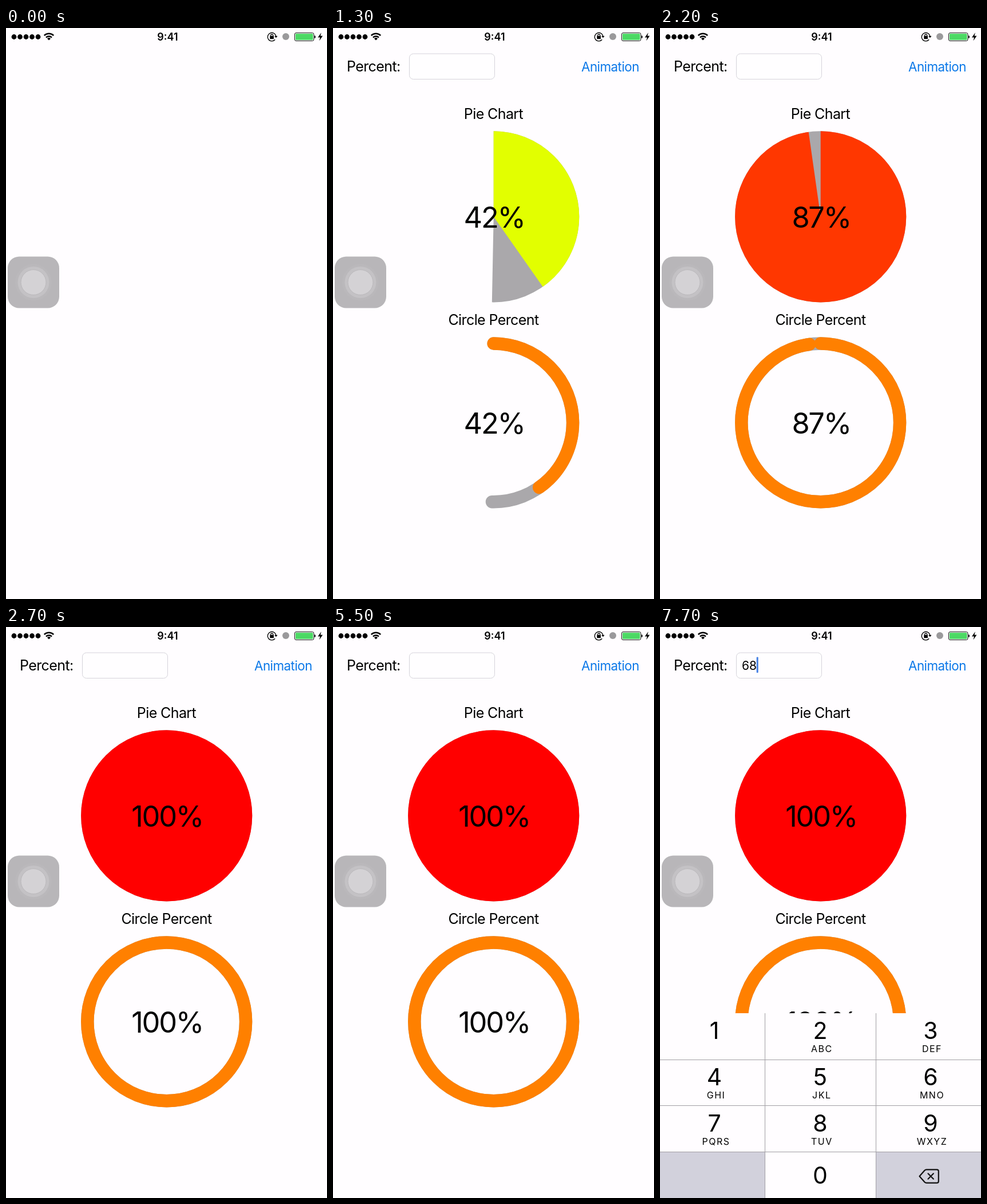
Write an HTML page that moves like this. It is 561x998 px and loops after 8 s.

```html
<!DOCTYPE html>
<html lang="en">
<head>
<meta charset="utf-8">
<title>Percent charts</title>
<style>
  html, body { margin: 0; width: 100%; height: 100%; overflow: hidden; background: #fffdff; }
  svg { display: block; font-family: Inter, Roboto, sans-serif; }
  .label { font-size: 25px; letter-spacing: -.024em; }
  .button { font-size: 22.4px; letter-spacing: -.024em; fill: #0b78e8; }
  .value { font-size: 50.5px; letter-spacing: -.045em; }
  .middle, .value, .digit, .letters { text-anchor: middle; }
  .digit { font-size: 41px; }
  .letters { font-size: 16px; letter-spacing: 1.5px; }
  .arc { fill: none; }
  .track { stroke: #aaa8ab; }
  .pie { stroke-width: 149.6; }
  .ring { stroke-width: 22.5; stroke-linecap: round; }
</style>
</head>
<body>
<svg width="561" height="998" viewBox="0 0 561 998">
  <rect width="561" height="998" fill="#fffdff"/>

  <g id="statusBar">
    <g id="signal"></g>
    <g fill="none" stroke="#000" stroke-width="2.5">
      <path d="M66.8 13.2a11.7 11.7 0 0 1 16.4 0"/>
      <path d="M70 16.6a7.2 7.2 0 0 1 10 0"/>
    </g>
    <path d="M75 21.6l-3-3.1a4.3 4.3 0 0 1 6 0z"/>
    <text class="middle" x="282.5" y="22" font-size="18" font-weight="600">9:41</text>
    <g fill="none" stroke="#000" stroke-width="1.4">
      <path d="M470.2 20.2a7.3 7.3 0 1 1 1.6-5.6"/>
      <path d="M462.8 14.5v-1.7a1.9 1.9 0 0 1 3.8 0v1.7"/>
    </g>
    <path d="M461.3 14h6.6v5.2h-6.6zM469.2 14h5.4l-2.7 3.2z"/>
    <circle cx="489" cy="15" r="6" fill="#9a999b"/>
    <rect x="504.5" y="8.5" width="33.5" height="14" rx="2.5" fill="none" stroke="#111"/>
    <rect x="506" y="10" width="30.5" height="11" rx="1" fill="#4cd964"/>
    <path d="M539 13a2 2.5 0 0 1 0 5z"/>
    <path d="M551 8l-6 8.5h4l-1.5 6 6-8.7h-4z"/>
  </g>

  <g id="content">
    <text class="label" x="24" y="76">Percent:</text>
    <rect x="133.5" y="45" width="149" height="44.5" rx="7" fill="#fffeff" stroke="#d5d3da"/>
    <text id="input" x="143" y="75" font-size="21"></text>
    <rect id="cursor" y="52.5" width="3" height="27.5" rx="1" fill="#4480e4"/>
    <text class="button" x="434" y="76">Animation</text>

    <text class="label middle" x="280.5" y="158.5">Pie Chart</text>
    <g transform="translate(280.7 329.8)">
      <g transform="rotate(-90)">
        <circle id="pieTrack" class="arc pie track" r="74.8" pathLength="1"/>
        <circle id="pie" class="arc pie" r="74.8" pathLength="1"/>
      </g>
      <text class="value" x="1" y="19.2"></text>
    </g>

    <text class="label middle" x="280.5" y="518.5">Circle Percent</text>
    <g transform="translate(280.7 689.8)">
      <g transform="rotate(-90)">
        <circle id="ringTrack" class="arc ring track" r="138.4" pathLength="1"/>
        <circle id="ring" class="arc ring" r="138.4" pathLength="1" stroke="#ff8000"/>
      </g>
      <text class="value" x="1" y="19.2"></text>
    </g>
  </g>

  <g id="keyboard">
    <rect y="675" width="561" height="323" fill="#fffdff"/>
    <g id="keys"></g>
    <path d="M0 756.5H561M0 836.5H561M0 917.5H561M183.5 675V998M377.5 675V998" stroke="#a19fa4"/>
    <g fill="none" stroke="#111" stroke-width="2.2" stroke-linejoin="round" stroke-linecap="round">
      <path d="M453.5 960l9-10.3q1.3-1.4 3.3-1.4h18q3 0 3 3v17.4q0 3-3 3h-18q-2 0-3.3-1.4z"/>
      <path d="M468.5 955.3l9.4 9.4m0-9.4l-9.4 9.4"/>
    </g>
  </g>

  <g id="assistButton">
    <rect x="3" y="399.5" width="90" height="90" rx="20" fill="#b8b6b9"/>
    <circle cx="48" cy="444.5" r="32" fill="#bab8bb"/>
    <circle cx="48" cy="444.5" r="27.5" fill="#c4c2c5"/>
    <circle cx="48" cy="444.5" r="22" fill="#d4d2d5" stroke="#bbb9bc"/>
  </g>
</svg>

<script>
const LOOP = 8000, STEP = 100;
const CONTENT_AT = 500, CHART_START = 414, CHART_TIME = 2000, COUNTER_LAG = 40;
const KEYBOARD_START = 5540, KEYBOARD_TIME = 420, KEYBOARD_HEIGHT = 324;
const PRESSES = [{ key: 6, down: 7100, up: 7300 }, { key: 8, down: 7500, up: 7700 }];
const KEY_GREY = '#d2d1dc';

const $ = id => document.getElementById(id);
const values = document.querySelectorAll('.value');
const clamp = x => Math.min(1, Math.max(0, x));

function add(parent, tag, attributes, text = '') {
  const node = document.createElementNS(parent.namespaceURI, tag);
  for (const name in attributes) node.setAttribute(name, attributes[name]);
  node.textContent = text;
  return parent.appendChild(node);
}

for (let i = 0; i < 5; i++) add($('signal'), 'circle', { cx: 14 + i * 10.5, cy: 15.5, r: 4.4 });

const edges = [0, 183.5, 377.5, 561];
const digitX = [95, 280, 473], letterX = [98, 282.8, 475.5];
const letters = ['', 'ABC', 'DEF', 'GHI', 'JKL', 'MNO', 'PQRS', 'TUV', 'WXYZ'];
const keyRects = {};

for (let i = 0; i < 12; i++) {
  const col = i % 3, row = Math.floor(i / 3), y = 675 + row * 81;
  const digit = i < 9 ? i + 1 : i === 10 ? 0 : '';
  const rect = add($('keys'), 'rect', {
    x: edges[col], y, width: edges[col + 1] - edges[col], height: 81,
    fill: digit === '' ? KEY_GREY : 'transparent'
  });
  if (digit === '') continue;
  keyRects[digit] = rect;
  add($('keys'), 'text', { class: 'digit', x: digitX[col], y: y + (row < 3 ? 44.5 : 55) }, digit);
  if (row < 3) add($('keys'), 'text', { class: 'letters', x: letterX[col], y: y + 67.5 }, letters[i]);
}

// cubic-bezier(.42, 0, .58, 1), solved by bisection
function easeInOut(x) {
  let low = 0, high = 1;
  for (let i = 0; i < 24; i++) {
    const s = (low + high) / 2, r = 1 - s;
    if (3 * r * s * (.42 * r + .58 * s) + s ** 3 < x) low = s; else high = s;
  }
  return low * low * (3 - 2 * low);
}

const show = (id, visible) => $(id).setAttribute('visibility', visible ? 'inherit' : 'hidden');
const setArc = (id, part) => $(id).setAttribute('stroke-dasharray', `${part} 2`);

function drawCharts(t) {
  const p = clamp((t - CHART_START) / CHART_TIME);
  const part = easeInOut(p);
  // the track's path runs a quarter turn past the full circle
  const track = Math.min(1, part * 1.25);
  for (const name of ['pie', 'ring']) {
    setArc(name, part);
    setArc(name + 'Track', track);
  }
  const channel = x => Math.round(255 * clamp(x));
  $('pie').setAttribute('stroke', `rgb(${channel(2 * p)}, ${channel(2 - 2 * p)}, 0)`);
  const counter = clamp((t - CHART_START - COUNTER_LAG) / CHART_TIME);
  for (const value of values) value.textContent = Math.floor(counter * 100) + '%';
}

function drawInput(t) {
  const slide = 1 - (1 - clamp((t - KEYBOARD_START) / KEYBOARD_TIME)) ** 3;
  $('keyboard').setAttribute('transform', `translate(0 ${KEYBOARD_HEIGHT * (1 - slide)})`);
  show('keyboard', slide > 0);

  let typed = '';
  for (const { key, down, up } of PRESSES) {
    keyRects[key].setAttribute('fill', t >= down && t < up ? KEY_GREY : 'transparent');
    if (t >= up) typed += key;
  }
  $('input').textContent = typed;
  $('cursor').setAttribute('x', 143.5 + typed.length * 12.6);
  show('cursor', slide > 0 && (typed || (t - 5500) % 1000 < 600));
}

function draw(now) {
  const t = Math.floor(now % LOOP / STEP) * STEP;
  show('content', t >= CONTENT_AT);
  drawCharts(t);
  drawInput(t);
}

const start = performance.now();
function tick() {
  draw(performance.now() - start);
  requestAnimationFrame(tick);
}
tick();
</script>
</body>
</html>
```
